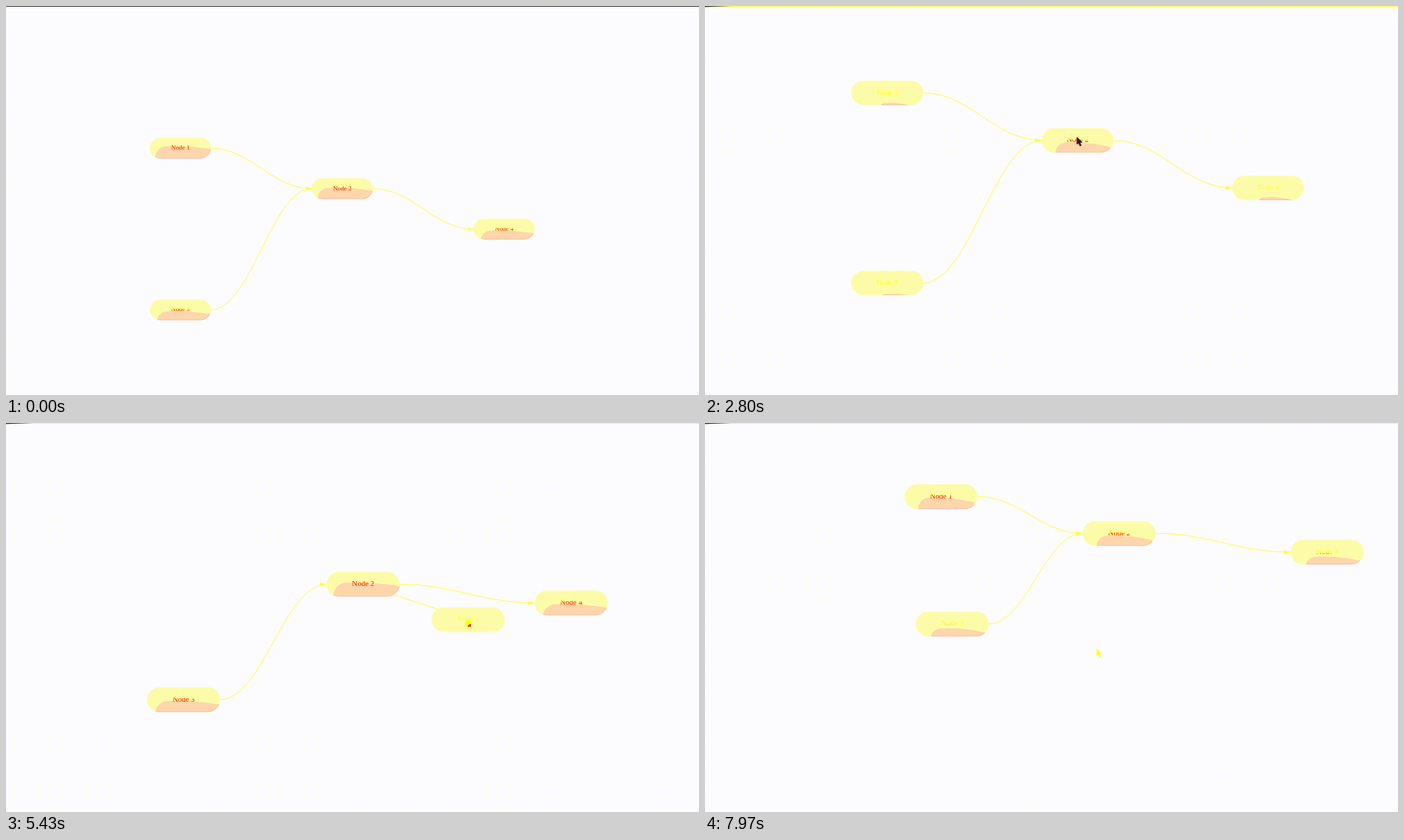
Recreate the animation shown at these times as an HTML page with a canvas. Size 998x561 px, loop 8000 ms.

```html
<!DOCTYPE html>
<html lang="en">
<head>
<meta charset="utf-8">
<title>Node graph</title>
<style>
html, body { margin: 0; width: 100%; height: 100%; overflow: hidden; background: #fcfcfe; }
canvas { display: block; }
</style>
</head>
<body>
<canvas id="stage" width="998" height="561"></canvas>
<script>
const LOOP = 8000, W = 998, H = 561;
const ctx = document.getElementById('stage').getContext('2d');
const YELLOW = '#ffff3c', PALE = '#fcfca8', PEACH = '#fdd6ac', RED = '#f01c1c', DARK = '#1c1c24';

// Grid origin and cell size, and the pans and zooms that change them.
const home = { x: 207.5, y: 190.5, g: 14.57 };
const moves = [
  { start: 600, end: 1250, x: 500, y: 146 },
  { start: 1250, end: 2050, x: 296, y: 143 },
  { start: 2050, end: 2400, x: 260, y: 121 },
  { start: 2700, end: 3250, x: -292, y: -25, g: 43.5 },
  { start: 3520, end: 3880, x: 203.5, y: 102.5, g: 17.44 },
  { start: 7150, end: LOOP, x: 286, y: 29 }
];

// Places are in grid cells. A drag runs to its end place, bulging once and swinging twice on the way.
const nodes = [
  { name: 'Node 1', at: [0, 0], fill: .6,
    drag: { start: 5000, end: 6200, to: [.11, 3.41], bulge: [20, 0], swing: [9, 14], grab: [3, 1] } },
  { name: 'Node 2', at: [16, 4], fill: .54,
    drag: { start: 3950, end: 4910, to: [14.82, 6.45], bulge: [3.46, 0], swing: [13, 13], grab: [2.6, .5] } },
  { name: 'Node 3', at: [0, 16], fill: .42,
    drag: { start: 6520, end: 7050, to: [1.03, 13.94], bulge: [8, -2], swing: [0, 3], grab: [2.9, 1.1] } },
  { name: 'Node 4', at: [32, 8], fill: .42 }
];
const links = [[0, 1], [2, 1], [1, 3]];

const lerp = (a, b, u) => a + (b - a) * u;
const progress = (t, start, end) => Math.min(1, Math.max(0, (t - start) / (end - start)));
const ease = u => u * u * (3 - 2 * u);

function viewAt(t) {
  const view = { ...home };
  for (const { start, end, ...goal } of moves) {
    const e = ease(progress(t, start, end));
    for (const key in goal) view[key] = lerp(view[key], goal[key], e);
  }
  return view;
}

function nodeAt({ at, drag }, t) {
  const { x, y, g } = viewAt(t);
  let cell = at;
  if (drag) {
    const u = progress(t, drag.start, drag.end);
    const bulge = Math.sin(Math.PI * u), swing = Math.sin(2 * Math.PI * u) ** 2;
    cell = at.map((p, i) => lerp(p, drag.to[i], ease(u)) + drag.bulge[i] * bulge + drag.swing[i] * swing);
  }
  return { x: x + cell[0] * g, y: y + cell[1] * g };
}

// The peach part is large on a node at rest and shrinks while the node moves.
function blobAt(node, t, g) {
  const now = nodeAt(node, t), before = nodeAt(node, Math.max(0, t - 120));
  const calm = Math.exp(-Math.hypot(now.x - before.x, now.y - before.y) / 28);
  const fill = node.fill + (g / home.g - 1) * .11;
  return {
    left: lerp(.48, .2 - fill * .2, calm),
    top: lerp(1.04, 1 - fill, calm),
    right: lerp(.62, 1, Math.sqrt(calm))
  };
}

function grabPoint(node, t) {
  const { x, y } = nodeAt(node, t), { g } = viewAt(t);
  return [x + node.drag.grab[0] * g, y + node.drag.grab[1] * g];
}

const dragged = nodes.filter(node => node.drag);
const stops = [
  [600, 428, 437], [1070, 666, 401], [1930, 585, 353], [2650, 536, 189],
  [6400, 254, 423], [7150, 482, 399], [LOOP, 564, 325],
  ...dragged.flatMap(node => [node.drag.start, node.drag.end].map(t => [t, ...grabPoint(node, t)]))
].sort((a, b) => a[0] - b[0]);

function pointerAt(t) {
  const held = dragged.find(({ drag }) => t >= drag.start && t < drag.end);
  if (held) return grabPoint(held, t);
  const next = stops.findIndex(stop => stop[0] > t);
  const [a, b] = [stops[next - 1], stops[next]];
  const e = ease(progress(t, a[0], b[0]));
  return [lerp(a[1], b[1], e), lerp(a[2], b[2], e)];
}

function polygon(points, fill) {
  ctx.beginPath();
  points.forEach(([x, y]) => ctx.lineTo(x, y));
  ctx.closePath();
  ctx.fillStyle = fill;
  ctx.fill();
}

function drawGrid({ x: ox, y: oy, g }) {
  const first = o => ((o % g) + g) % g - g;
  ctx.fillStyle = g > 25 ? '#fcfcc0' : '#fdfde0';
  ctx.beginPath();
  for (let x = first(ox); x < W + g; x += g)
    for (let y = first(oy) + g * .015; y < H + g; y += g) {
      ctx.moveTo(x, y);
      ctx.arc(x, y, g * .055, 0, 7);
    }
  ctx.fill();
}

function drawLink(a, b, g, shaded) {
  const x1 = a.x + 6 * g, y1 = a.y + g, x2 = b.x, y2 = b.y + g, reach = (x2 - x1) * .4;
  ctx.beginPath();
  ctx.moveTo(x1, y1);
  ctx.bezierCurveTo(x1 + reach, y1, x2 - reach, y2, x2, y2);
  ctx.lineWidth = Math.max(1, g * .043);
  ctx.strokeStyle = YELLOW;
  if (shaded) {
    const fade = ctx.createLinearGradient(0, 0, 240, 0);
    fade.addColorStop(0, '#4c4c48');
    fade.addColorStop(.3, '#5c5c40');
    fade.addColorStop(1, YELLOW);
    ctx.strokeStyle = fade;
  }
  ctx.stroke();
  const back = x2 - g * .57, half = g * .16;
  polygon([[x2, y2], [back, y2 - half], [back, y2 + half]], YELLOW);
  if (shaded) polygon([[x2 - g * .2, y2 + half * .4], [back + g * .06, y2], [back + g * .06, y2 + half]], '#4c4c48');
}

function blobPath(x, y, g, { left, top, right }, lift) {
  const px = f => x + 6 * g * f, py = f => y + 2 * g * (f - lift);
  const end = lerp(Math.min(1, top + .14), 1, Math.min(1, (1 - right) * 2.5));
  const crest = lerp(left, right, .2);
  ctx.beginPath();
  ctx.moveTo(px(left), y + 2.1 * g);
  ctx.bezierCurveTo(px(left), py(lerp(1, top, .5)), px(lerp(left, crest, .4)), py(top), px(crest), py(top));
  ctx.bezierCurveTo(px(lerp(crest, right, .45)), py(top - .04), px(lerp(crest, right, .7)), py(lerp(top, end, .4)), px(right + .01), py(end));
  ctx.lineTo(px(right + .01), y + 2.1 * g);
  ctx.closePath();
}

function drawNode(name, x, y, g, blob) {
  const label = color => {
    ctx.fillStyle = color;
    ctx.fillText(name, x + 3 * g, y + 1.15 * g);
  };
  const pill = (fill, border) => {
    ctx.beginPath();
    ctx.roundRect(x, y, 6 * g, 2 * g, g);
    ctx.fillStyle = fill;
    ctx.strokeStyle = border;
    ctx.fill();
    ctx.stroke();
    label('#ffff1c');
  };
  const insideBlob = (lift, paint) => {
    ctx.save();
    blobPath(x, y, g, blob, lift);
    ctx.clip();
    paint();
    ctx.restore();
  };
  ctx.font = `${g * .63}px "Liberation Serif", serif`;
  ctx.textAlign = 'center';
  ctx.lineWidth = Math.max(1, g * .045);
  pill(PALE, '#fdfdb4');
  if (blob.top > .98) return;

  let ink = RED;
  if (g > 25) {
    const cx = x + 2.75 * g, cy = y + 1.2 * g;
    ink = ctx.createRadialGradient(cx, cy, g * .2, cx, cy, g * .65);
    ink.addColorStop(0, DARK);
    ink.addColorStop(.5, DARK);
    ink.addColorStop(1, RED);
  }
  insideBlob(0, () => pill(PEACH, '#f8bcb8'));
  insideBlob(.12, () => label(ink));
}

function drawPointer(t) {
  if (t < 600) return;
  const arrow = [[0, 0], [0, 11], [2.5, 9], [4.5, 13.5], [6.5, 12.5], [4.7, 8.2], [8, 8]];
  const holding = t < 2300 || dragged.some(({ drag }) => t >= drag.start && t < drag.end);
  const [x, y] = pointerAt(t);
  ctx.save();
  ctx.translate(x, y);
  if (holding) {
    polygon([[0, 0], [2, 2], [5, 4], [4, 10], [-3, 10], [-5, 6], [-3, 3]], '#ffff00');
    polygon([[4, 6], [4, 10], [-1, 10], [1, 7]], '#d80c24');
  } else if (t > 7150) {
    polygon(arrow, '#ffff18');
  } else {
    polygon(arrow.map(([px, py]) => [px - 1, py]), '#f04848');
    polygon(arrow, DARK);
  }
  ctx.restore();
}

function drawTopLine(t) {
  ctx.fillStyle = t < 30 ? '#2c2c2c' : '#ffff28';
  ctx.fillRect(0, 0, W, 1);
  if (t >= 30) polygon([[0, 0], [38, 0], [0, 1.5]], '#34341c');
}

function draw(t) {
  const view = viewAt(t), { g } = view;
  ctx.fillStyle = '#fcfcfe';
  ctx.fillRect(0, 0, W, H);
  drawGrid(view);
  const placed = nodes.map(node => nodeAt(node, t));
  links.forEach(([a, b], i) => drawLink(placed[a], placed[b], g, i === 0 && g > 40));
  nodes.forEach((node, i) => drawNode(node.name, placed[i].x, placed[i].y, g, blobAt(node, t, g)));
  drawPointer(t);
  drawTopLine(t);
}

const start = performance.now();
function tick() {
  draw((performance.now() - start) % LOOP);
  requestAnimationFrame(tick);
}
tick();
</script>
</body>
</html>
```
